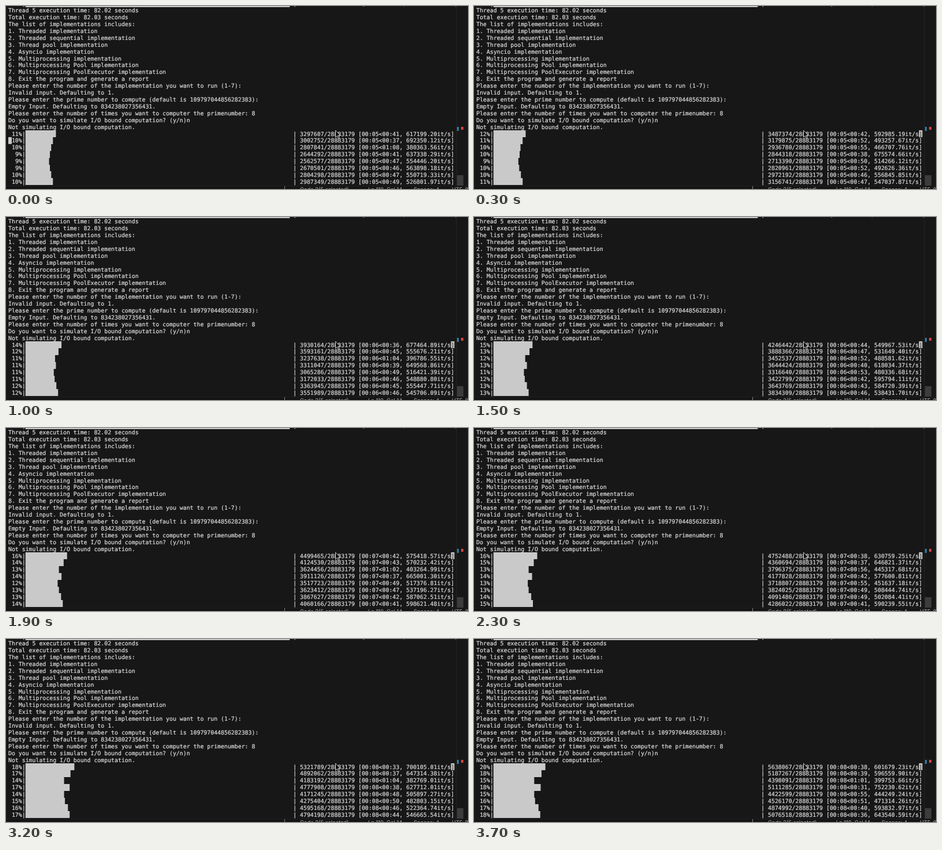
An HTML page for the animation above (3800 ms loop, 800 by 318 pixels).

```html
<!DOCTYPE html>
<html lang="en">
<head>
<meta charset="utf-8">
<title>Prime progress</title>
<style>
  html, body { margin: 0; width: 100%; height: 100%; overflow: hidden; background: #171717; }
  svg { display: block; width: 100%; height: 100%; }
  text { white-space: pre; text-rendering: geometricPrecision; }
  #term text { font: 9.87px "DejaVu Sans Mono", monospace; fill: #dcdcdc; stroke: #dcdcdc; stroke-width: .22px; }
  #term .under { fill: #171717; stroke: none; }
  #status text { font: 9.4px Inter, "Open Sans", sans-serif; fill: #b4b4b4; }
  .bar { fill: #c9c9c9; }
</style>
</head>
<body>
<svg viewBox="0 0 800 318" preserveAspectRatio="none">
  <rect width="800" height="318" fill="#171717"/>
  <g id="term"></g>
  <g id="gutter">
    <rect x="779.5" width="1" height="312" fill="#262626"/>
    <rect x="781" y="210" width="3" height="7" fill="#2f7fa8"/>
    <rect x="788" y="210" width="4" height="5" fill="#d8453f"/>
    <rect x="781" y="294" width="11" height="18" fill="#3c3c3c"/>
  </g>
  <g id="status">
    <rect y="312.5" width="800" height="5.5" fill="#141414"/>
    <rect y="312.5" width="800" height="1" fill="#232323"/>
  </g>
  <path d="M570.5 216v12.2l2.8-2.6 2 4.6 2-.9-2-4.4h3.7z" fill="#111" stroke="#d8d8d8" stroke-width=".9"/>
</svg>
<script>
const NS = "http://www.w3.org/2000/svg";
const LEFT = 4, CELL = 5.942, PITCH = 11.91, TOP = 1.6, BASE = 9.6;
const BAR_COLS = 78, TOTAL = 28883179, LOOP = 3800, STEP = 100;
const term = document.getElementById("term");
const status = document.getElementById("status");

const log = [
  "Thread 5 execution time: 82.02 seconds",
  "Total execution time: 82.03 seconds",
  "The list of implementations includes:",
  "1. Threaded implementation",
  "2. Threaded sequential implementation",
  "3. Thread pool implementation",
  "4. Asyncio implementation",
  "5. Multiprocessing implementation",
  "6. Multiprocessing Pool implementation",
  "7. Multiprocessing PoolExecutor implementation",
  "8. Exit the program and generate a report",
  "Please enter the number of the implementation you want to run (1-7):",
  "Invalid input. Defaulting to 1.",
  "Please enter the prime number to compute (default is 109797044856282383):",
  "Empty Input. Defaulting to 834238027356431.",
  "Please enter the number of times you want to computer the primenumber: 8",
  "Do you want to simulate I/O bound computation? (y/n)n",
  "Not simulating I/O bound computation."
];

// First and last count of each worker; each runs at a steady pace.
const workers = [
  [3297607, 5638067], [3002752, 5187267], [2807841, 4398091], [2644292, 5111285],
  [2562577, 4422599], [2670501, 4526170], [2804298, 4874992], [2987349, 5076518]
];

function add(parent, tag, attrs, content = "") {
  const el = document.createElementNS(NS, tag);
  for (const key in attrs) el.setAttribute(key, attrs[key]);
  el.textContent = content;
  return parent.appendChild(el);
}

const colX = col => LEFT + col * CELL;
const rowY = row => TOP + row * PITCH;
const write = (row, col, s) => add(term, "text", { x: colX(col), y: rowY(row) + BASE }, s);

function clock(sec) {
  const pad = n => String(Math.floor(n)).padStart(2, "0");
  return pad(sec / 60) + ":" + pad(sec % 60);
}

function makeBar(row) {
  const bar = add(term, "rect", {
    class: "bar", x: colX(5), y: Math.round(rowY(row)),
    height: Math.round(rowY(row + 1)) - Math.round(rowY(row))
  });
  const percent = write(row, 0, "");
  write(row, 4, "|");
  const info = write(row, 83, "");
  return (count, rate, elapsed) => {
    const part = count / TOTAL;
    const label = Math.round(part * 100) + "%";
    bar.setAttribute("width", Math.floor(part * BAR_COLS * 8) / 8 * CELL);
    percent.setAttribute("x", colX(4 - label.length));
    percent.textContent = label;
    info.textContent = `| ${count}/${TOTAL} [${clock(elapsed)}<${clock((TOTAL - count) / rate)}, ${rate.toFixed(2)}it/s]`;
  };
}

// Repeatable noise in 0..1.
function noise(a, b) {
  const v = Math.sin(a * 127.1 + b * 311.7 + 1) * 43758.5453;
  return v - Math.floor(v);
}

// Measured speed wavers around the worker's real pace.
function rateOf(i, step) {
  const [from, to] = workers[i];
  const pace = (to - from) / (LOOP - STEP) * 1000;
  return pace * (.8 + .2 * (noise(i, step) + noise(i, step + 1)));
}

makeBar(-1)(28519000, 352118.46, 81);
log.forEach((line, row) => write(row, 0, line));
const bars = workers.map((_, i) => makeBar(log.length + i));

const cursor = add(term, "rect", { class: "bar", width: CELL, height: PITCH });
const under = write(log.length, 129, "]");
under.setAttribute("class", "under");

[[481, "|"], [509, "Code 2(5 selected)"], [627, "Ln 110, Col 14"], [706, "Spaces: 4"], [772, "UTF-8"]]
  .forEach(([x, s]) => add(status, "text", { x, y: 321.5 }, s));

let shown = -1;
function draw(now) {
  const step = Math.floor(now % LOOP / STEP);
  if (step === shown) return;
  shown = step;
  const t = step * STEP;
  bars.forEach((set, i) => {
    const [from, to] = workers[i];
    const count = Math.round(from + (to - from) * t / (LOOP - STEP));
    set(count, rateOf(i, step), 5.15 + t / 1000);
  });
  const first = step === 0;
  cursor.setAttribute("x", colX(first ? 0 : 129));
  cursor.setAttribute("y", rowY(log.length + (first ? 1 : 0)));
  under.setAttribute("visibility", first ? "hidden" : "visible");
}

const start = performance.now();
function tick() {
  draw(performance.now() - start);
  requestAnimationFrame(tick);
}
tick();
</script>
</body>
</html>
```
